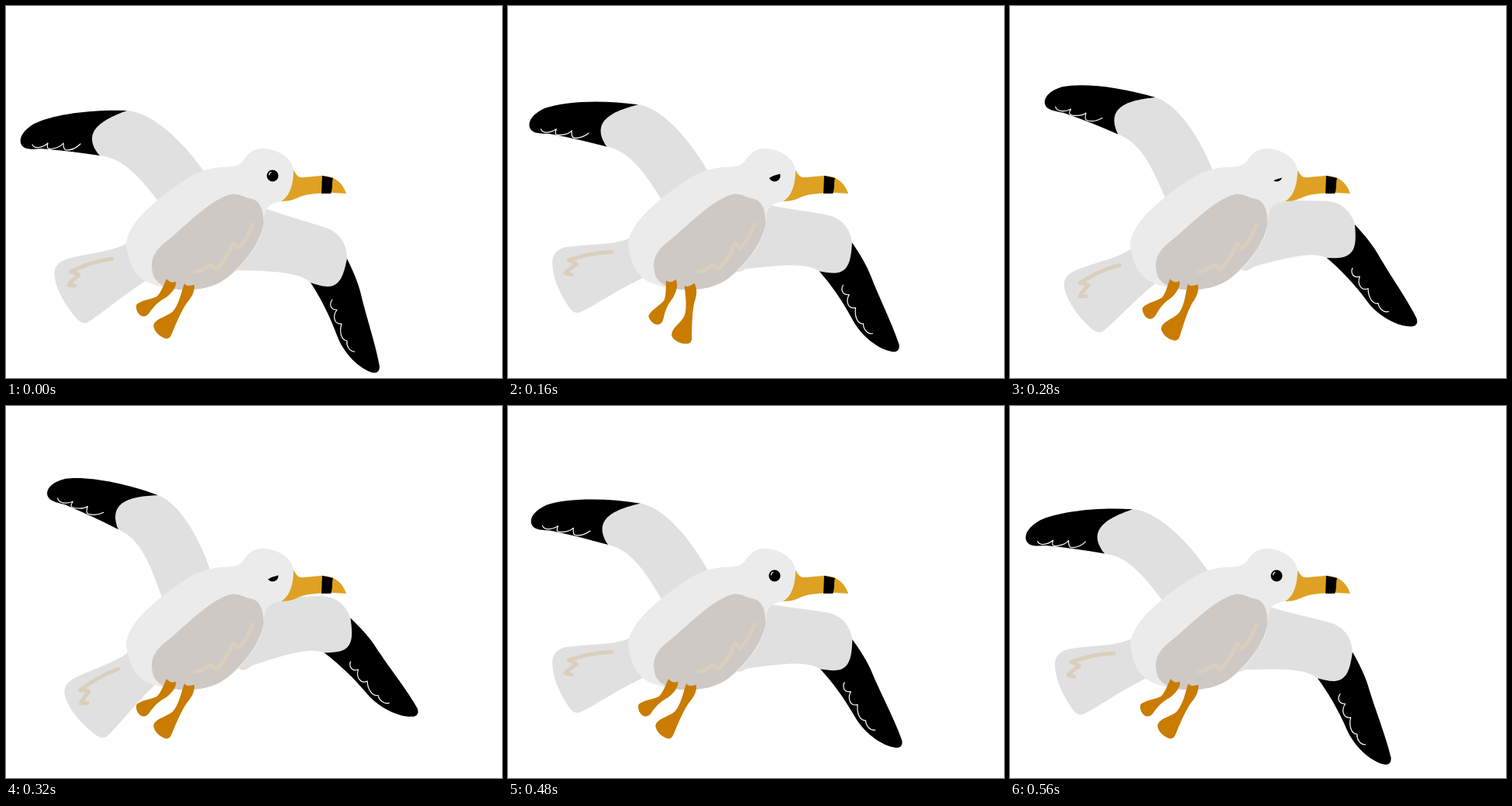
Write an HTML page that moves like this. It is 640 px wide and 480 px high and loops after 0.6 s.

```html
<!DOCTYPE html>
<html lang="en">
<head>
<meta charset="utf-8">
<title>Flying gull</title>
<style>
  html, body { margin: 0; width: 100%; height: 100%; overflow: hidden; background: #fff; }
  svg { display: block; width: 100%; height: 100%; }
  .line { fill: none; stroke-linecap: round; stroke-linejoin: round; }
  .sand { stroke: #dacfbd; stroke-width: 5; }
  .chalk { stroke: #fff; stroke-width: 1.2; }
  .wing { fill: #e0e0e0; }
  .leg { fill: #c97c00; }
</style>
</head>
<body>
<svg viewBox="0 0 640 480">
  <defs>
    <clipPath id="socket"><circle cx="344" cy="219" r="9"/></clipPath>
  </defs>

  <g id="tail">
    <path class="wing" d="M160 304C140 317 110 318 80 326C66 330 61 338 63 350C65 367 78 388 90 402C96 409 101 411 107 407C120 400 150 373 185 352L215 300Z"/>
    <path class="line sand" d="M137 326C115 329 100 335 83 343C88 344 92 345 94 347C89 351 83 356 81 360L89 361"/>
  </g>

  <g id="wingL">
    <path class="wing" d="M156 135C185 136 225 170 255 213L275 245L215 275L195 250C170 218 150 196 121 193C96 163 123 147 156 135Z"/>
    <path d="M156 135C110 133 60 140 36 152C23 160 17 169 19 177C22 186 32 185 45 184C70 186 95 189 121 193C96 163 123 147 156 135Z"/>
    <path class="line chalk" d="M34 179C37 185 47 183 54 177C52 184 54 185 60 184C66 183 71 181 74 177C74 182 75 186 78 186C84 186 91 183 96 178"/>
  </g>

  <g id="wingR">
    <path class="wing" d="M290 250L337 262C365 272 395 280 415 287C432 294 440 308 440 326C436 345 432 362 415 362C408 362 400 359 393 357C380 345 355 342 300 341C294 343 288 345 284 341L270 320Z"/>
    <path d="M440 326C447 340 455 358 458 372C464 398 478 440 482 465C482 473 477 474 473 473C455 468 435 447 427 425C418 400 405 375 393 357C400 359 408 362 415 362C432 362 436 345 440 326Z"/>
    <path class="line chalk" d="M421 379C417 384 418 392 427 392C421 400 423 411 433 410C430 420 432 431 440 432C439 438 443 446 450 446"/>
  </g>

  <path fill="#ebebeb" d="M371 212C370 198 352 184 332 184C316 184 312 192 305 201C298 208 290 207 280 208C265 209 252 212 240 219C215 233 185 258 172 273C162 284 155 298 155 308C157 325 163 345 180 355C195 363 215 366 240 366C290 362 315 325 329 297C333 285 332 272 335 265C338 257 345 253 357 252C365 250 373 235 371 212Z"/>
  <path fill="#cfc9c6" d="M290 243C300 241 305 247 318 249C330 253 333 268 332 283C326 310 306 333 285 351C270 362 252 366 236 366C215 367 198 362 191 350C184 330 190 318 204 306C230 286 262 250 290 243Z"/>
  <path class="line sand" d="M244 343C252 342 258 339 263 334C266 333 268 340 272 339C280 332 288 318 293 306C296 305 296 312 300 312C308 305 314 293 318 282"/>

  <path id="legB" class="leg" d="M207 352C210 356 215 358 219 355C221 363 212 372 207 376C200 380 192 386 186 396C181 403 177 402 173 399C169 395 168 390 169 386C175 380 188 379 195 375C200 370 203 361 207 352Z"/>
  <path id="legF" class="leg" d="M230 358C233 363 239 360 243 360C244 370 238 378 233 384C226 395 220 410 214 425C211 431 207 430 203 428C197 426 191 418 191 413C193 403 208 402 216 394C224 384 226 370 230 358Z"/>

  <path fill="#dea123" d="M371 212C376 220 378 222 385 221L407 219C425 218 436 231 439 242L421 241C400 241 385 243 375 248C368 251 362 252 355 252C366 246 371 230 371 212Z"/>
  <path d="M408 219L422 222C420 229 422 236 419 242L407 242Z"/>

  <g clip-path="url(#socket)">
    <circle cx="344" cy="219" r="7.5"/>
    <path class="line chalk" d="M339.5 218C339.5 216 340.5 215 342 214.5"/>
    <path id="lid" fill="#ebebeb"/>
  </g>
  <path id="shut" class="line" stroke="#000" stroke-width="2.4" d="M341 226.3Q345 224.4 350 225.6"/>
</svg>
<script>
  const LOOP = 600, STEP = 40, TOP = 320, BLINK = 240;
  const $ = id => document.getElementById(id);

  // 0 at rest, 1 with the wings raised
  function flap(t, rise, fall, end) {
    if (t < TOP) return (t / TOP) ** rise;
    return 1 - Math.min(1, (t - TOP) / (end - TOP)) ** fall;
  }

  // The tail dips as the wings peak and returns to rest at the loop ends
  function wag(t) {
    const swing = 0.114 * Math.abs(t - TOP) - 11.5;
    return Math.min(swing, 0.14 * Math.min(t, LOOP - t));
  }

  const kick = t => Math.max(0, 1 - Math.abs(t - TOP / 2) / (TOP / 2));

  // The lid shuts faster than it opens
  const lidY = t => 228 - Math.abs(t - BLINK) * (t < BLINK ? 0.095 : 0.069);

  function turn(id, angle, x, y) {
    $(id).setAttribute("transform", `rotate(${angle.toFixed(3)} ${x} ${y})`);
  }

  function draw(t) {
    turn("wingL", 18.2 * flap(t, 1.65, 1.05, 576), 238, 251);
    turn("wingR", -19.7 * flap(t, 1.32, 1.15, LOOP), 291, 287);
    turn("tail", wag(t), 207, 293);
    turn("legF", 0.8 - 22 * kick(t), 236, 365);
    turn("legB", 1.2 - 23 * kick(t), 211, 361);

    const y = lidY(t);
    $("lid").setAttribute("d", `M330 200V${y + 6}Q344 ${y - 4} 358 ${y - 5}V200Z`);
    $("shut").style.display = t === BLINK ? "" : "none";
  }

  function tick() {
    const t = performance.now() % LOOP;
    draw(Math.floor(t / STEP) * STEP);
    requestAnimationFrame(tick);
  }
  tick();
</script>
</body>
</html>
```
